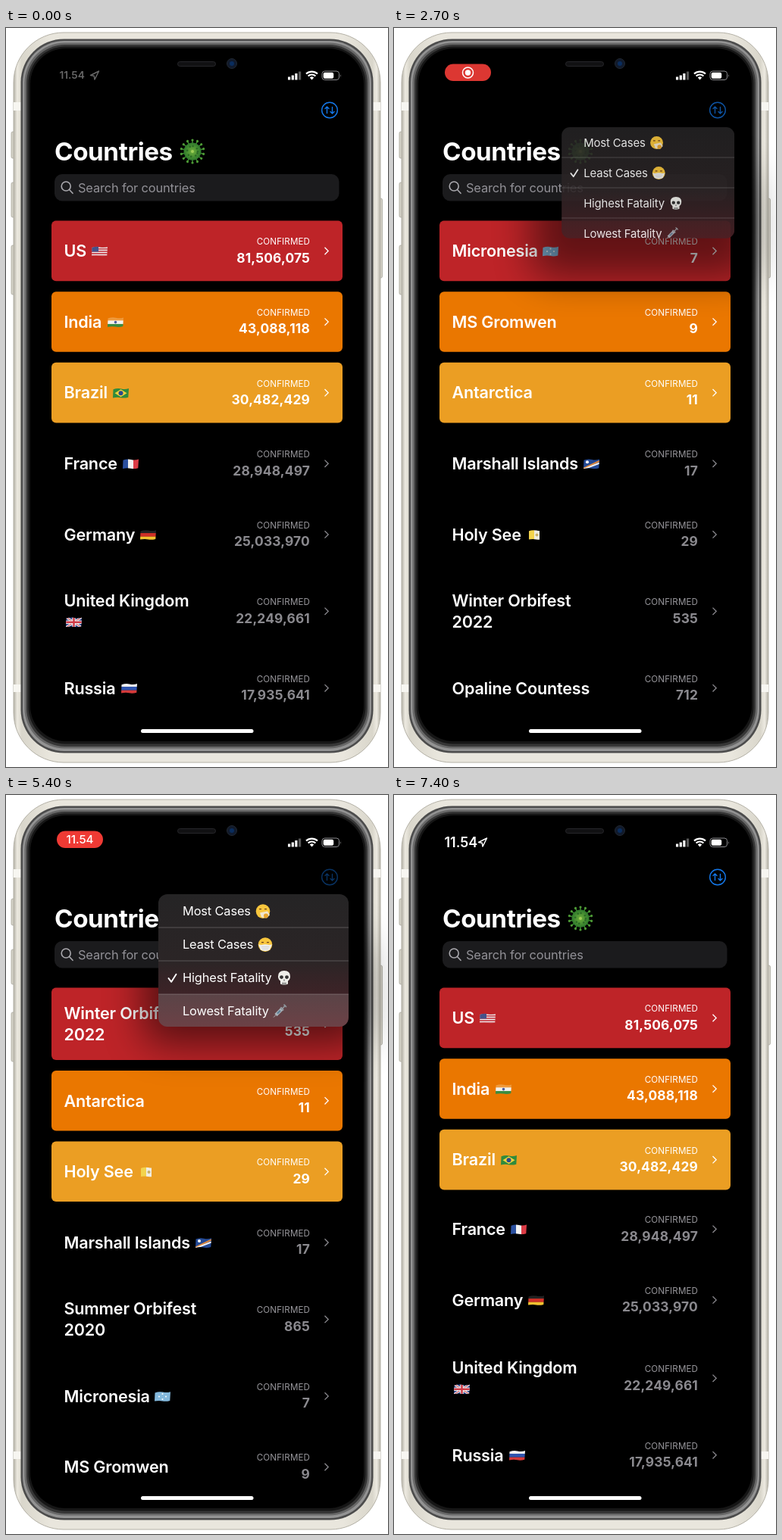
An HTML page that plays this animation: 504x976 px, repeating every 7500 ms.

```html
<!DOCTYPE html>
<html lang="en">
<head>
<meta charset="utf-8">
<title>Country list</title>
<style>
  html, body { margin: 0; width: 100%; height: 100%; overflow: hidden; background: #fff; }
  svg { display: block; width: 504px; height: 976px; }
  text { font-family: Inter, "Noto Sans", sans-serif; fill: #fff; white-space: pre; }
  .heading { font-size: 33.2px; font-weight: 700; letter-spacing: -.4px; }
  .title { font-size: 21.6px; font-weight: 600; letter-spacing: -.2px; }
  .label { font-size: 11.6px; letter-spacing: .1px; text-anchor: end; }
  .count { font-size: 17.4px; font-weight: 700; letter-spacing: .15px; text-anchor: end; }
  .body { font-size: 16.4px; letter-spacing: -.15px; }
  .plain .label { fill: #98979c; }
  .plain .count { fill: #8b8a8f; }
</style>
</head>
<body>
<svg viewBox="0 0 504 976" xmlns="http://www.w3.org/2000/svg">
  <defs>
    <linearGradient id="rim" x2="1" y2="0">
      <stop stop-color="#b3b0a5"/><stop offset=".01" stop-color="#edeae1"/>
      <stop offset=".022" stop-color="#d9d6cb"/><stop offset=".1" stop-color="#e9e6dd"/>
      <stop offset=".9" stop-color="#e9e6dd"/><stop offset=".978" stop-color="#d9d6cb"/>
      <stop offset=".99" stop-color="#edeae1"/><stop offset="1" stop-color="#b3b0a5"/>
    </linearGradient>
    <linearGradient id="glass" gradientUnits="userSpaceOnUse" x1="0" y1="131" x2="0" y2="306">
      <stop stop-color="#252425"/><stop offset=".5" stop-color="#2b2526"/>
      <stop offset=".75" stop-color="#3d2327"/><stop offset="1" stop-color="#522026"/>
    </linearGradient>
    <radialGradient id="germ"><stop stop-color="#6fb03c"/><stop offset="1" stop-color="#2f7a2c"/></radialGradient>
    <filter id="soft" x="-50%" y="-100%" width="200%" height="300%"><feGaussianBlur stdDeviation="26"/></filter>
    <clipPath id="wave"><path d="M.5 2Q6 0 11 1.200T21 .8L20.300 12.500Q15 14 10.500 13T0 13.200Z"/></clipPath>
    <clipPath id="menuClip"><rect id="menuArea" x="201" y="131" width="251" height="175" rx="12"/></clipPath>
  </defs>

  <g id="phone">
    <g fill="#d5d2c8" stroke="#a9a79d" stroke-width=".8">
      <rect x="7" y="137" width="6" height="35" rx="2"/>
      <rect x="7" y="204" width="6" height="46" rx="2"/>
      <rect x="7" y="287" width="6" height="65" rx="2"/>
      <rect x="490" y="225" width="6.500" height="105" rx="2"/>
    </g>
    <rect x="10" y="6" width="484" height="964" rx="66" fill="url(#rim)" stroke="#b5b2a7"/>
    <path d="M10 98h10v11h-10zM484 98h10v11h-10zM10 867h10v10h-10zM484 867h10v10h-10z" fill="#f7f6f1"/>
    <rect x="19.500" y="14.500" width="465" height="943" rx="57" fill="#4c4c4c"/>
    <rect x="22" y="17" width="460" height="938" rx="55" fill="#939393"/>
    <rect x="24.500" y="19.500" width="455" height="932" rx="53" fill="#686868"/>
    <rect x="27" y="22" width="450" height="927" rx="51" fill="#363636"/>
    <rect x="29.500" y="24.500" width="445" height="921" rx="49" fill="#161616"/>
    <rect x="32" y="27" width="440" height="915" rx="47"/>
    <rect x="226.500" y="44.500" width="50" height="6" rx="3" fill="#111113" stroke="#26262a"/>
    <circle cx="298" cy="47" r="6.500" fill="#111a2b" stroke="#222831"/>
    <circle cx="298" cy="47" r="3" fill="#0a2d5e"/>
  </g>

  <g id="clock">
    <text id="clockTime" x="66.500" y="69" font-size="18" font-weight="600">11.54</text>
    <path d="M111.500 62.500L122.500 57L117 68L116.200 63.300Z" fill="none" stroke="#fff" stroke-width="1.500" stroke-linejoin="round"/>
  </g>
  <g id="pill">
    <rect id="pillShape" x="67" y="47.500" width="61" height="22.500" rx="11.200"/>
    <g id="recIcon">
      <circle cx="97.500" cy="59" r="7" fill="none" stroke="#fff" stroke-width="1.500"/>
      <circle cx="97.500" cy="59" r="3.700" fill="#fff"/>
    </g>
    <text id="pillTime" x="97.500" y="64.300" font-size="15.200" font-weight="500" text-anchor="middle">11.54</text>
  </g>
  <g fill="#fff">
    <path d="M372 64.500h3.200v4h-3.200zM376.700 62.500h3.200v6h-3.200zM381.300 60h3.200v8.500h-3.200z"/>
    <path d="M386 57.500h3.200v11h-3.200z" opacity=".35"/>
    <path d="M403.500 68.500l-2.700-3a4 4 0 0 1 5.400 0z"/>
    <path d="M396 60.500a11 11 0 0 1 15 0M398.600 63.500a7 7 0 0 1 9.800 0" fill="none" stroke="#fff" stroke-width="2.200"/>
    <rect x="417" y="57" width="22.500" height="11.500" rx="3.500" fill="none" stroke="#8a8a8e"/>
    <rect x="418.700" y="58.700" width="13.500" height="8.100" rx="2"/>
    <path d="M441 61v4q1.800-2 0-4z" fill="#8a8a8e"/>
  </g>

  <g id="sort" fill="none" stroke="#1478ea" stroke-width="1.400" stroke-linecap="round" stroke-linejoin="round">
    <circle cx="427" cy="108.500" r="10.300"/>
    <path d="M423.500 112.500v-8.500l-2.500 2.500m2.500-2.500l2.500 2.500M430.500 104.500v8.500l-2.500-2.500m2.500 2.500l2.500-2.500"/>
  </g>

  <g id="lists"></g>
  <rect id="shade" x="182" y="190" width="290" height="138" rx="20" filter="url(#soft)"/>

  <text class="heading" x="64" y="175">Countries</text>
  <g id="virus" transform="translate(246 163)"></g>
  <rect x="64" y="193" width="375.500" height="35.500" rx="10" fill="#1b1b1d"/>
  <path d="M84 214l4 4.300M85.200 209a6 6 0 1 0-12 0a6 6 0 1 0 12 0" fill="none" stroke="#aaa9ae" stroke-width="1.600" stroke-linecap="round"/>
  <text class="body" x="95" y="216.500" style="fill:#929197">Search for countries</text>
  <rect x="178" y="926" width="148.500" height="5" rx="2.500" fill="#fff"/>

  <g id="menu" clip-path="url(#menuClip)">
    <rect x="201" y="131" width="251" height="175" fill="url(#glass)"/>
    <rect id="press" x="201" width="251" height="44" fill="#fff"/>
    <path d="M201 175h251M201 219h251M201 263h251" stroke="#fff" stroke-opacity=".22"/>
    <path id="tick" d="M214.500 0l3.700 4.700l6.300-10" fill="none" stroke="#fff" stroke-width="1.900" stroke-linecap="round" stroke-linejoin="round"/>
    <g id="options"></g>
  </g>
</svg>

<script>
const LOOP = 7500, STEP = 100;
const $ = id => document.getElementById(id);
const clamp = v => Math.max(0, Math.min(1, v));
const ramp = (t, from, to) => clamp((t - from) / (to - from));
const show = (id, alpha) => {
  $(id).setAttribute('opacity', alpha.toFixed(3));
  $(id).style.display = alpha > 0 ? '' : 'none';
};

// Flags live in a 21 x 14 box
const box = (x, y, w, h, fill) => `<rect x="${x}" y="${y}" width="${w}" height="${h}" fill="${fill}"/>`;
const disc = (x, y, r, fill) => `<circle cx="${x}" cy="${y}" r="${r}" fill="${fill}"/>`;
const line = (d, stroke, width) => `<path d="${d}" stroke="${stroke}" stroke-width="${width}" fill="none"/>`;
const bands = (...colors) => colors.map((c, i) => box(0, i * 14 / colors.length, 21, 14 / colors.length + .1, c)).join('');
const poles = (...colors) => colors.map((c, i) => box(i * 21 / colors.length, 0, 21 / colors.length + .1, 14, c)).join('');
const cross = 'M0 0L21 14M0 14L21 0', plus = 'M10.5 0V14M0 7H21';
const flags = {
  us: bands('#c8414b', '#eee', '#c8414b', '#eee', '#c8414b', '#eee', '#c8414b', '#eee', '#c8414b') + box(0, 0, 9, 7.5, '#44528a'),
  india: bands('#ef9a3c', '#f2f2ee', '#3a8c3f') + disc(10.5, 7, 1.8, '#4b5da0'),
  brazil: box(0, 0, 21, 14, '#2f8b3c') + '<path d="M2.500 7L10.500 2L18.500 7L10.500 12Z" fill="#f0d23c"/>' + disc(10.5, 7, 3, '#2b4a8c'),
  france: poles('#2b50a0', '#f2f2f2', '#dc3c46'),
  germany: bands('#222', '#d03028', '#f2c230'),
  uk: box(0, 0, 21, 14, '#2b4289') + line(cross, '#eee', 3) + line(cross, '#d03a46', 1) + line(plus, '#eee', 4.5) + line(plus, '#d03a46', 2.5),
  russia: bands('#f2f2f2', '#2f55b0', '#d53a3a'),
  mexico: poles('#2a7a4b', '#f2f2f2', '#cf3540') + disc(10.5, 7, 2, '#9a7645'),
  peru: poles('#d53440', '#f2f2f2', '#d53440'),
  micronesia: box(0, 0, 21, 14, '#83b8dc') + [[10.5, 3.5], [10.5, 10.5], [6, 7], [15, 7]].map(([x, y]) => disc(x, y, 1, '#fff')).join(''),
  marshall: box(0, 0, 21, 14, '#244a96') + line('M0 13L21 3', '#e48a3a', 2) + line('M0 14L21 6', '#f4f4f4', 2) + disc(5, 4.5, 2, '#fff'),
  holy: box(1, 0, 7, 14, '#f3d34c') + box(8, 0, 7, 14, '#f0ede2') + disc(11.5, 7, 2, '#c8b06a')
};

// title, count, flag, flag x
const places = {
  us: ['US', '81,506,075', 'us', 113],
  india: ['India', '43,088,118', 'india', 134],
  brazil: ['Brazil', '30,482,429', 'brazil', 141],
  france: ['France', '28,948,497', 'france', 154],
  germany: ['Germany', '25,033,970', 'germany', 177],
  uk: ['United Kingdom|', '22,249,661', 'uk', 79],
  russia: ['Russia', '17,935,641', 'russia', 152],
  mexico: ['Mexico', '5,738,680', 'mexico', 160],
  peru: ['Peru', '3,562,184', 'peru', 134],
  micronesia: ['Micronesia', '7', 'micronesia', 196],
  liner: ['MS Gromwen', '9'],
  antarctica: ['Antarctica', '11'],
  marshall: ['Marshall Islands', '17', 'marshall', 250],
  holy: ['Holy See', '29', 'holy', 177],
  winter: ['Winter Orbifest|2022', '535'],
  summer: ['Summer Orbifest|2020', '865'],
  cruiser: ['Opaline Countess', '712']
};
const cardColors = ['#be2428', '#ea7700', '#eb9e23'];

function rowMarkup(key, index, top) {
  const [title, count, flag, flagX] = places[key];
  const lines = title.split('|');
  const height = lines.length > 1 ? 94.7 : 79;
  const mid = top + height / 2;
  const lineMid = i => mid + (i - (lines.length - 1) / 2) * 28;
  const color = cardColors[index];
  const card = color ? `<rect x="60" y="${top - .4}" width="384" height="${height + .6}" rx="6" fill="${color}"/>` : '';
  const titles = lines.map((s, i) => `<text class="title" x="76.500" y="${lineMid(i) + 7.7}">${s}</text>`).join('');
  const banner = flag ? `<g transform="translate(${flagX} ${lineMid(lines.length - 1) - 6.5})"><g clip-path="url(#wave)">${flags[flag]}</g></g>` : '';
  const markup = `<g class="row ${color ? '' : 'plain'}">${card}${titles}${banner}
    <text class="label" x="401" y="${mid - 8.2}">CONFIRMED</text>
    <text class="count" x="401" y="${mid + 15.2}">${count}</text>
    <path d="M420.500 ${mid - 4.7}l4.700 4.700l-4.700 4.700" fill="none" stroke="${color ? '#fff' : '#8b8a8f'}" stroke-width="1.300"/></g>`;
  return { markup, next: top + height + 14.6 };
}

function listMarkup(id, keys) {
  let top = 255, rows = '';
  keys.split(' ').forEach((key, i) => {
    const row = rowMarkup(key, i, top);
    rows += row.markup;
    top = row.next;
  });
  return `<g id="${id}">${rows}</g>`;
}

$('lists').innerHTML =
  listMarkup('most', 'us india brazil france germany uk russia') +
  listMarkup('least', 'micronesia liner antarctica marshall holy winter cruiser') +
  listMarkup('highest', 'us brazil india russia mexico peru uk') +
  listMarkup('lowest', 'winter antarctica holy marshall summer micronesia liner');
const settling = [...$('most').querySelectorAll('.row')].slice(3, 5);

$('virus').innerHTML = Array.from({ length: 14 }, (_, i) =>
  `<g transform="rotate(${i * 360 / 14})">${line('M0 -10V-15', '#3c8a30', 1.5)}${disc(0, -15, 1.6, '#4d9a35')}</g>`).join('') +
  disc(0, 0, 11.5, 'url(#germ)') +
  Array.from({ length: 9 }, (_, i) => disc(7 * Math.cos(i * 2.4), 7 * Math.sin(i * 2.4), 1.3, '#2b6b26')).join('') +
  disc(0, 0, 2, '#a1cf58');

// Menu icons, each centred on its own origin
const eyes = line('M-5 -3h3M2 -3h3', '#70431a', 1.4);
const icons = [
  disc(0, 0, 9.3, '#f8c63d') + eyes + '<path d="M-4 2L6 0L9 5L5 9L-2 8Z" fill="#f1e6cf"/>' + disc(4, 6, 3, '#e8a52e'),
  disc(0, 0, 9.3, '#f8c63d') + eyes + '<path d="M-9 0L-5 .5Q0 -1 5 .5L9 0L6 7Q0 10 -6 7Z" fill="#ededea"/>' + line('M-5 3h10M-4 5.500h8', '#c4c6c8', .7),
  '<path d="M-8 -2Q-8 -9.500 0 -9.500T8 -2Q8 2 5 4V8Q0 10.500 -5 8V4Q-8 2 -8 -2Z" fill="#eeeeea"/>' + disc(-3.5, -1, 2.4, '#333') + disc(3.5, -1, 2.4, '#333') + line('M0 2v2M-2 6v3M0 6v3M2 6v3', '#444', 1),
  line('M-8 8L-3 3', '#aab0b5', 1) + line('M-5 5L4 -4', '#a9b2b9', 4.5) + line('M-3 3L1 -1', '#5f7f96', 2.2) + line('M4 -4L8 -8M5.500 -9L9 -5.500M1 -5L5 -1', '#8d959b', 1.5)
];
const optionMid = i => 153.3 + 44 * i;
$('options').innerHTML = [['Most Cases', 339], ['Least Cases', 342], ['Highest Fatality', 367], ['Lowest Fatality', 361]]
  .map(([name, x], i) => `<text class="body" x="233" y="${optionMid(i) + 5.9}">${name}</text>
    <g transform="translate(${x} ${optionMid(i) + .3})">${icons[i]}</g>`).join('');

const menus = [
  { open: 535, press: 1500, close: 1690, checked: 0, pressed: 1 },
  { open: 2535, press: 3400, close: 3590, checked: 1, pressed: 2 },
  { open: 4435, press: 5200, close: 5490, checked: 2, pressed: 3 },
  { open: 6135, press: 6600, close: 6790, checked: 3, pressed: 0 }
];

function drawMenu(t) {
  const m = menus.find(m => t > m.open && t < m.close + 240);
  const opening = m ? ramp(t, m.open, m.open + 320) : 0;
  const closing = m ? ramp(t, m.close, m.close + 240) : 0;
  const shown = closing > 0 ? 1 - closing : 1 - (1 - opening) ** 3;
  show('menu', shown);
  show('shade', .55 * shown);
  show('sort', 1 - .58 * (closing > 0 ? 1 - closing ** 2 : opening));
  if (!m) return;
  const scale = .2 + .8 * shown;
  $('menu').setAttribute('transform', `translate(422 131) scale(${scale}) translate(-422 -131)`);
  $('menuArea').setAttribute('height', 175 * scale ** .85);
  $('press').setAttribute('y', 131 + 44 * m.pressed);
  show('press', t >= m.press ? .15 : 0);
  $('tick').setAttribute('transform', `translate(0 ${optionMid(m.checked) + .8})`);
}

function drawLists(t) {
  const between = (in0, in1, out0, out1) => ramp(t, in0, in1) * (1 - ramp(t, out0, out1));
  const returning = ramp(t, 7100, 7400);
  show('most', t < 1900 ? 1 - ramp(t, 1650, 1800) : returning);
  show('least', between(1850, 2100, 3500, 3650));
  show('highest', between(3850, 4100, 5100, 5250));
  show('lowest', between(5200, 5400, 7100, 7350));
  const lift = t > 7000 ? -2 - 14 * (1 - returning) ** 2 : 0;
  settling.forEach(row => row.setAttribute('transform', `translate(0 ${lift})`));
}

function drawStatus(t) {
  const ending = t >= 7300;
  show('clock', ending ? 1 : .4 * (1 - ramp(t, 0, 150)));
  $('clockTime').setAttribute('transform', ending ? '' : 'translate(20 15) scale(.76)');
  show('pill', ramp(t, 50, 250) * (1 - ramp(t, 7150, 7300)));
  const glow = .5 + .5 * Math.cos((t - 3850) * Math.PI / 1000);
  $('pillShape').setAttribute('fill', `rgb(${218 + 36 * glow},${55 + 5 * glow},${50 + 4 * glow})`);
  const swap = ramp(t, 3100, 3300);
  show('recIcon', 1 - swap);
  show('pillTime', swap);
}

const start = performance.now();
function frame() {
  const t = Math.floor(((performance.now() - start) % LOOP) / STEP) * STEP;
  drawStatus(t);
  drawLists(t);
  drawMenu(t);
  requestAnimationFrame(frame);
}
frame();
</script>
</body>
</html>
```
